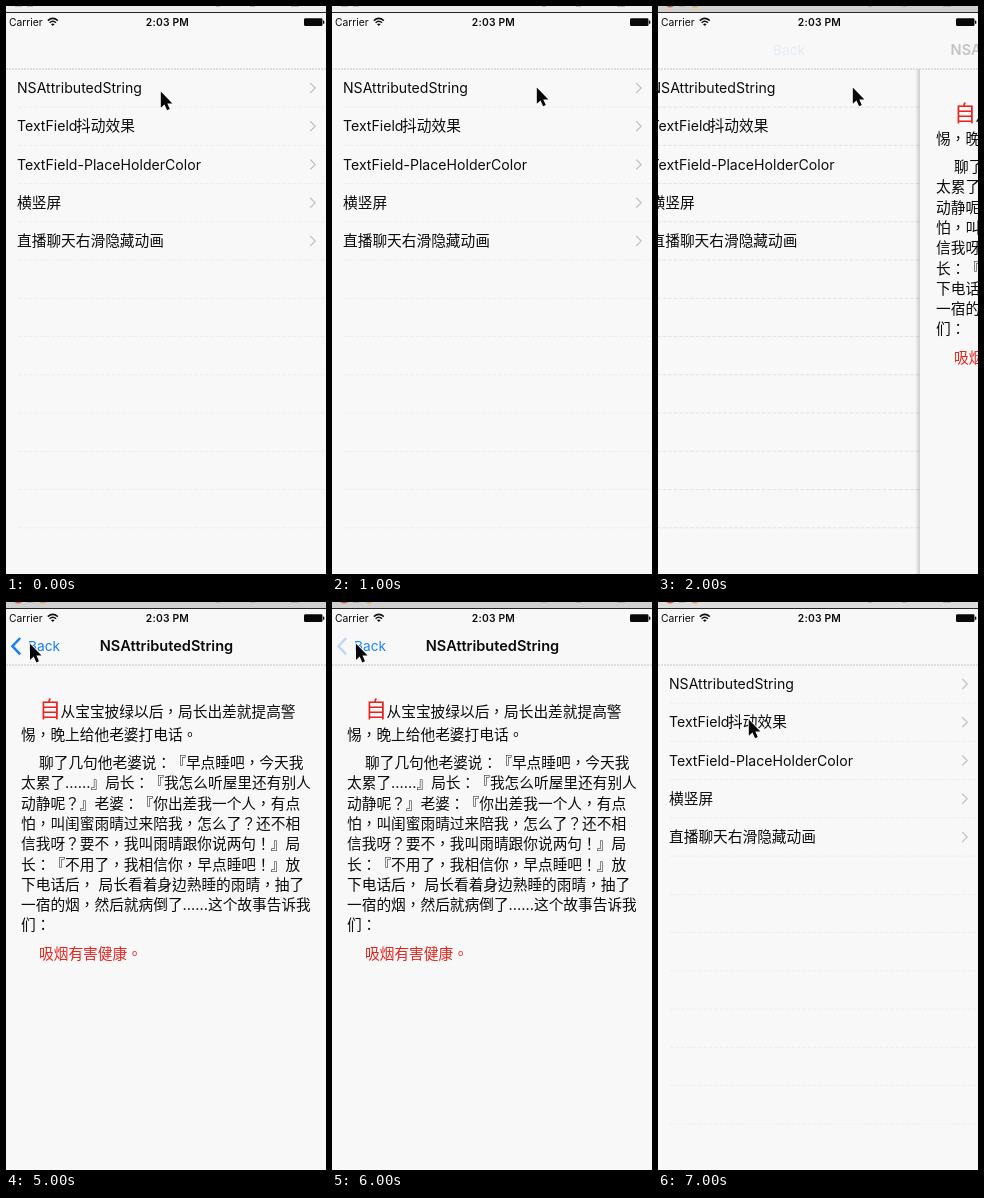
Animation, 320 px wide and 568 px high, one loop 8 s. Source, as an HTML page:

```html
<!DOCTYPE html>
<html lang="zh-Hant">
<head>
<meta charset="utf-8">
<title>List navigation</title>
<style>
html, body { margin: 0; width: 100%; height: 100%; overflow: hidden; background: #f8f8f8; }
svg { display: block; width: 320px; height: 568px; }
text {
  font-family: Inter, "Noto Sans CJK TC", "Noto Sans CJK", sans-serif;
  font-size: 14.1px;
  text-spacing-trim: space-all;
  fill: #0c0c0c;
}
.cjk { font-size: 14.7px; font-feature-settings: "chws" 0, "halt" 0; }
.big { font-size: 22px; }
.red { fill: #e8241c; }
.status { font-size: 10.3px; }
.bold { font-weight: 600; }
.arrow { fill: none; stroke: #c4c4c8; stroke-width: 1.3; }
</style>
</head>
<body>
<svg viewBox="0 0 320 568">
  <defs>
    <linearGradient id="fade">
      <stop offset="0" stop-color="#000" stop-opacity="0"/>
      <stop offset="1" stop-color="#000" stop-opacity=".18"/>
    </linearGradient>
  </defs>
  <rect width="320" height="568" fill="#f8f8f8"/>

  <g id="list"></g>

  <g id="page">
    <rect x="-6" y="63" width="5" height="505" fill="url(#fade)"/>
    <rect x="-1" y="63" width="321" height="505" fill="#f8f8f8"/>
  </g>

  <rect y="7" width="320" height="56" fill="#f8f8f8"/>
  <path d="M0 63H320" stroke="#c6c6c6" stroke-dasharray="2 1"/>
  <g id="nav">
    <path id="chevron" d="M14.2 36L6.4 44.2L14.2 52.4" fill="none" stroke="#147efb" stroke-width="2.5"/>
    <text id="back" y="49" style="font-size:13.7px;fill:#147efb">Back</text>
    <text id="title" class="bold" y="49" text-anchor="middle" style="font-size:14.55px">NSAttributedString</text>
  </g>

  <rect id="strip" width="320" height="6"/>
  <path id="marks" d="M9 0h7m5 0h6m183 0h4m30 0h5m36 0h8" stroke="#aaa" stroke-width="1.5"/>
  <g id="lights">
    <circle cx="12" cy="-3" r="4.6" fill="#e0584f"/>
    <circle cx="37" cy="-3" r="4.6" fill="#e6a53c"/>
  </g>
  <rect y="6" width="320" height="1" fill="#282828"/>

  <text class="status" x="3" y="19.8">Carrier</text>
  <g fill="none" stroke="#111" stroke-width="1.5">
    <path d="M41.8 14.6Q46.8 10.2 51.8 14.6M43.6 16.7Q46.8 13.9 50 16.7"/>
    <path d="M46.8 20L45 18.2Q46.8 16.7 48.6 18.2Z" fill="#111" stroke="none"/>
  </g>
  <text class="status bold" x="161.4" y="19.9" text-anchor="middle" letter-spacing=".2">2:03 PM</text>
  <rect x="298" y="12.3" width="18.5" height="7.8" rx="1.4" fill="#080808"/>
  <rect x="317" y="14.6" width="1.3" height="3.2" rx=".6" fill="#080808"/>

  <path id="cursor" d="M0 0V16.2L3.7 12.8L6.3 18.6L9 17.4L6.5 11.8H11.6Z"
    fill="#080808" stroke="#fff" stroke-width="1.4" paint-order="stroke"/>
</svg>
<script>
const $ = id => document.getElementById(id);

function add(parent, name, attrs, text) {
  const el = document.createElementNS("http://www.w3.org/2000/svg", name);
  for (const key in attrs) el.setAttribute(key, attrs[key]);
  if (text) el.textContent = text;
  parent.append(el);
  return el;
}

const list = $("list"), page = $("page");
const top0 = 62.8, rowHeight = 38.25;

const rules = add(list, "g", { "stroke-dasharray": "4 1.5" });
for (let i = 1; i < 13; i++) {
  add(rules, "path", { d: `M12 ${top0 + i * rowHeight}H340` });
}

[["NSAttributedString"], ["TextField", "抖动效果"], ["TextField-PlaceHolderColor"],
 ["", "横竖屏"], ["", "直播聊天右滑隐藏动画"]].forEach(([latin, han], i) => {
  const y = top0 + (i + 0.5) * rowHeight;
  const label = add(list, "text", { x: 11, y: y + 5.2 }, latin);
  if (han) add(label, "tspan", { class: "cjk", dx: latin ? -1.4 : 0 }, han);
  add(list, "path", { class: "arrow", d: `M304.2 ${y - 5}l5 5l-5 5` });
});

const line = (x, y, text, cls = "") => add(page, "text", { x, y, class: "cjk " + cls }, text);

line(33, 115, "自", "red big");
line(54.5, 115, "从宝宝披绿以后，局长出差就提高警");
line(15, 137.5, "惕，晚上给他老婆打电话。");
[
  "聊了几句他老婆说：『早点睡吧，今天我",
  "太累了......』局长：『我怎么听屋里还有别人",
  "动静呢？』老婆：『你出差我一个人，有点",
  "怕，叫闺蜜雨晴过来陪我，怎么了？还不相",
  "信我呀？要不，我叫雨晴跟你说两句！』局",
  "长：『不用了，我相信你，早点睡吧！』放",
  "下电话后， 局长看着身边熟睡的雨晴，抽了",
  "一宿的烟，然后就病倒了......这个故事告诉我",
  "们："
].forEach((text, i) => line(i ? 15 : 33, 166 + i * 20.3, text));
line(33, 357.3, "吸烟有害健康。", "red");

// Each screen lists its list offset, page offset and navigation bar state.
const screens = {
  menu: { list: 0, rule: "#ededed" },
  push: { list: -18.5, rule: "#e3e3e3", page: 263, back: 115, backAlpha: .1, title: 359.3, titleAlpha: .22, chevron: 0 },
  text: { page: 0, back: 22, backAlpha: 1, title: 160.5, titleAlpha: 1, chevron: 1 },
  press: { page: 0, back: 22, backAlpha: .95, title: 160.5, titleAlpha: 1, chevron: .25 }
};

// One step per second: screen, cursor x, cursor y, strip colour.
const steps = [
  ["menu", 154.8, 85.6, "#eeeeee"],
  ["menu", 204.8, 81.6, "#eeeeee"],
  ["push", 194.8, 81.6, "#d0d0d0"],
  ["text", 120.8, 173.8, "#d0d0d0"],
  ["text", 88, 267, "#d0d0d0"],
  ["text", 24, 41.8, "#d0d0d0"],
  ["press", 24, 41.8, "#d0d0d0"],
  ["menu", 90.8, 117.6, "#dddddd"]
];

const show = (el, on) => el.setAttribute("display", on ? "inline" : "none");
const move = (el, x, y = 0) => el.setAttribute("transform", `translate(${x} ${y})`);
let current = -1;

function draw(index) {
  const [name, x, y, strip] = steps[index], s = screens[name];
  const open = s.page !== undefined;
  show(list, s.list !== undefined);
  show(page, open);
  show($("nav"), open);
  if (s.list !== undefined) {
    move(list, s.list);
    rules.setAttribute("stroke", s.rule);
  }
  if (open) {
    move(page, s.page);
    $("back").setAttribute("x", s.back);
    $("back").setAttribute("opacity", s.backAlpha);
    $("title").setAttribute("x", s.title);
    $("title").setAttribute("opacity", s.titleAlpha);
    $("chevron").setAttribute("opacity", s.chevron);
  }
  $("strip").setAttribute("fill", strip);
  show($("lights"), index > 1);
  move($("cursor"), x, y);
}

const start = performance.now();
function tick() {
  const index = Math.floor((performance.now() - start) / 1000) % steps.length;
  if (index !== current) draw(current = index);
  requestAnimationFrame(tick);
}
tick();
</script>
</body>
</html>
```
